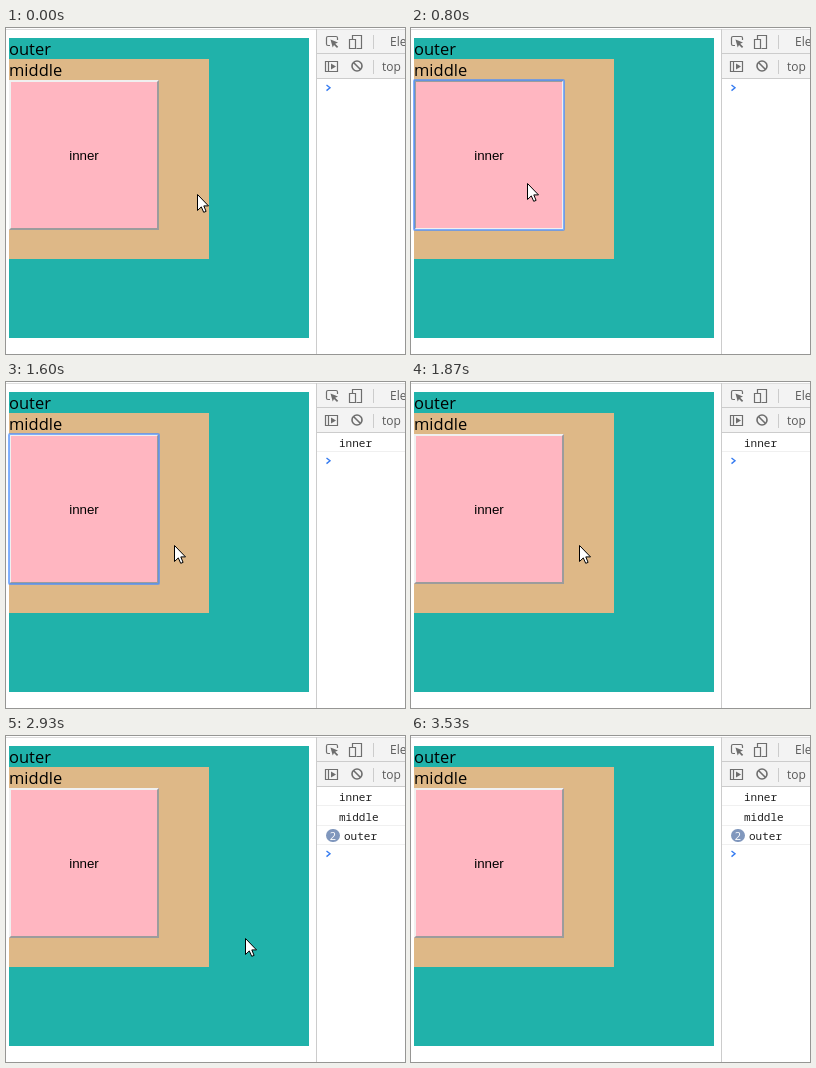
Recreate the animation shown at these times as an HTML page. Size 399 by 326 pixels, loop 4.14 s.

```html
<!DOCTYPE html>
<html lang="en">
<head>
<meta charset="utf-8">
<title>Event bubbling</title>
<style>
  html, body { margin: 0; width: 100%; height: 100%; overflow: hidden; background: #fff; }
  svg { display: block; width: 399px; height: 326px; }

  .page { font: 16.5px "Open Sans", sans-serif; }
  .label { font: 13.33px "Liberation Sans", Arial, sans-serif; text-anchor: middle; }
  .tools { font: 12px "Open Sans", sans-serif; fill: #5a5a5a; }
  .log { font: 11px "Noto Sans Mono", monospace; fill: #222; }
  .count { font: 11px "Open Sans", sans-serif; fill: #fff; text-anchor: middle; }
  .icon { fill: none; stroke: #6e6e6e; stroke-width: 1.2; }
  .solid { fill: #6e6e6e; stroke: none; }
  .rule { fill: #ccc; }
  .row { fill: #f0f0f0; }

  /* Everything jumps between held states of one shared 4.14 s loop */
  .anim { animation: 4140ms step-end infinite; }
  .lit { fill: #f0f0f0; animation-name: lit; }
  .shade { fill: #9c9c9c; animation-name: shade; }
  .ring { animation-name: ring; }
  .first { animation-name: first; }
  .second { animation-name: second; }
  .single { animation-name: single; }
  .double { animation-name: double; }
  .prompt { animation-name: prompt; }
  .cursor { animation-name: cursor; }

  @keyframes lit { 0%, 21.01% { fill: #f0f0f0 } 19.32% { fill: #9c9c9c } }
  @keyframes shade { 0%, 21.01% { fill: #9c9c9c } 19.32% { fill: #f0f0f0 } }
  @keyframes ring { 0%, 45.16%, 100% { opacity: 0 } 19.32% { opacity: 1 } }
  @keyframes first { 0% { opacity: 0 } 21.01%, 100% { opacity: 1 } }
  @keyframes second { 0% { opacity: 0 } 48.3%, 100% { opacity: 1 } }
  @keyframes single { 0%, 70.77%, 100% { opacity: 0 } 48.3% { opacity: 1 } }
  @keyframes double { 0% { opacity: 0 } 70.77%, 100% { opacity: 1 } }
  @keyframes prompt {
    0% { transform: translateY(0) }
    21.01% { transform: translateY(19px) }
    48.3%, 100% { transform: translateY(58px) }
  }
  @keyframes cursor {
    0% { transform: translate(191px, 166px) }
    6.52% { transform: translate(174px, 162px) }
    8.21% { transform: translate(136px, 157px) }
    9.66% { transform: translate(116px, 155px) }
    32.12% { transform: translate(138px, 157px) }
    33.81% { transform: translate(150px, 159px) }
    35.5% { transform: translate(160px, 161px) }
    36.95% { transform: translate(166px, 162px) }
    38.64% { transform: translate(168px, 163px) }
    54.83% { transform: translate(172px, 166px) }
    56.28% { transform: translate(195px, 179px) }
    57.97% { transform: translate(226px, 196px) }
    59.66% { transform: translate(239px, 202px) }
    75.6% { transform: translate(234px, 207px) }
    77.29% { transform: translate(217px, 221px) }
    78.98% { transform: translate(188px, 242px) }
    80.43% { transform: translate(152px, 267px) }
    82.12% { transform: translate(113px, 294px) }
    83.81% { transform: translate(76px, 317px) }
    85.26%, 100% { transform: translate(60px, 340px) }
  }
</style>
</head>
<body>
<svg viewBox="0 0 399 326">
  <g class="page">
    <rect x="3" y="10" width="300" height="300" fill="#20b2aa"/>
    <rect x="3" y="31" width="200" height="200" fill="#deb887"/>
    <text x="3" y="27">outer</text>
    <text x="3" y="48">middle</text>
  </g>

  <rect x="3" y="52" width="150" height="150" fill="#ffb6c1"/>
  <path class="anim lit" d="M3 52H153L151 54H5V200L3 202Z"/>
  <path class="anim shade" d="M153 202V52L151 54V200H5L3 202Z"/>
  <rect class="anim ring" x="3" y="52" width="150" height="150" rx="1"
        fill="none" stroke="#4d90fe" stroke-opacity=".7" stroke-width="2"/>
  <text class="label" x="78" y="132">inner</text>

  <g class="tools">
    <rect x="311" y="1" width="88" height="49" fill="#f3f3f3"/>
    <rect y="1" width="399" height="1" fill="#dedede"/>
    <path class="rule" d="M310 1h1v325h-1zM311 25h88v1h-88zM311 50h88v1h-88zM367 7h1v14h-1zM367 32h1v14h-1z"/>
    <g class="icon">
      <path d="M324 17.5h-2q-1.5 0-1.5-1.5v-6q0-1.500 1.500-1.500h8q1.500 0 1.500 1.500v2"/>
      <path class="solid" d="M324.500 11.500l7.500 3-2.800 1.200 3 3-1.200 1.200-3-3-1.300 2.600z"/>
      <path d="M346.500 11V7.500h9v13h-5M343.500 11.500h6v9h-6z"/>
      <path d="M319.500 33.500h12v10h-12zM322.500 33.500v10"/>
      <path class="solid" d="M325 35.500l5 3-5 3z"/>
      <circle cx="351" cy="38" r="5" stroke-width="1.600"/>
      <path d="M347.500 34.500l7 7" stroke-width="1.600"/>
    </g>
    <text x="384" y="18">Ele</text>
    <text x="376" y="43">top</text>
  </g>

  <g class="log">
    <g class="anim first">
      <text x="333" y="65">inner</text>
      <rect class="row" x="311" y="69" width="88" height="1"/>
    </g>
    <g class="anim second">
      <text x="333" y="85">middle</text>
      <path class="row" d="M311 89h88v1h-88zM311 108h88v1h-88z"/>
    </g>
    <text class="anim single" x="333" y="104">outer</text>
    <g class="anim double">
      <rect x="320" y="93" width="14" height="13" rx="6.500" fill="#8097bd"/>
      <text class="count" x="327" y="103.500">2</text>
      <text x="338" y="104">outer</text>
    </g>
    <path class="anim prompt" d="M320.500 57l3.500 2.800-3.500 2.800" fill="none" stroke="#367cf1" stroke-width="1.400"/>
  </g>

  <path class="anim cursor" d="M.5 .5V16.500L4.300 12.900 6.700 18.300 9.100 17.400 6.800 11.900H11.500Z"
        fill="#fff" stroke="#000" stroke-linejoin="round"/>
</svg>
</body>
</html>
```
